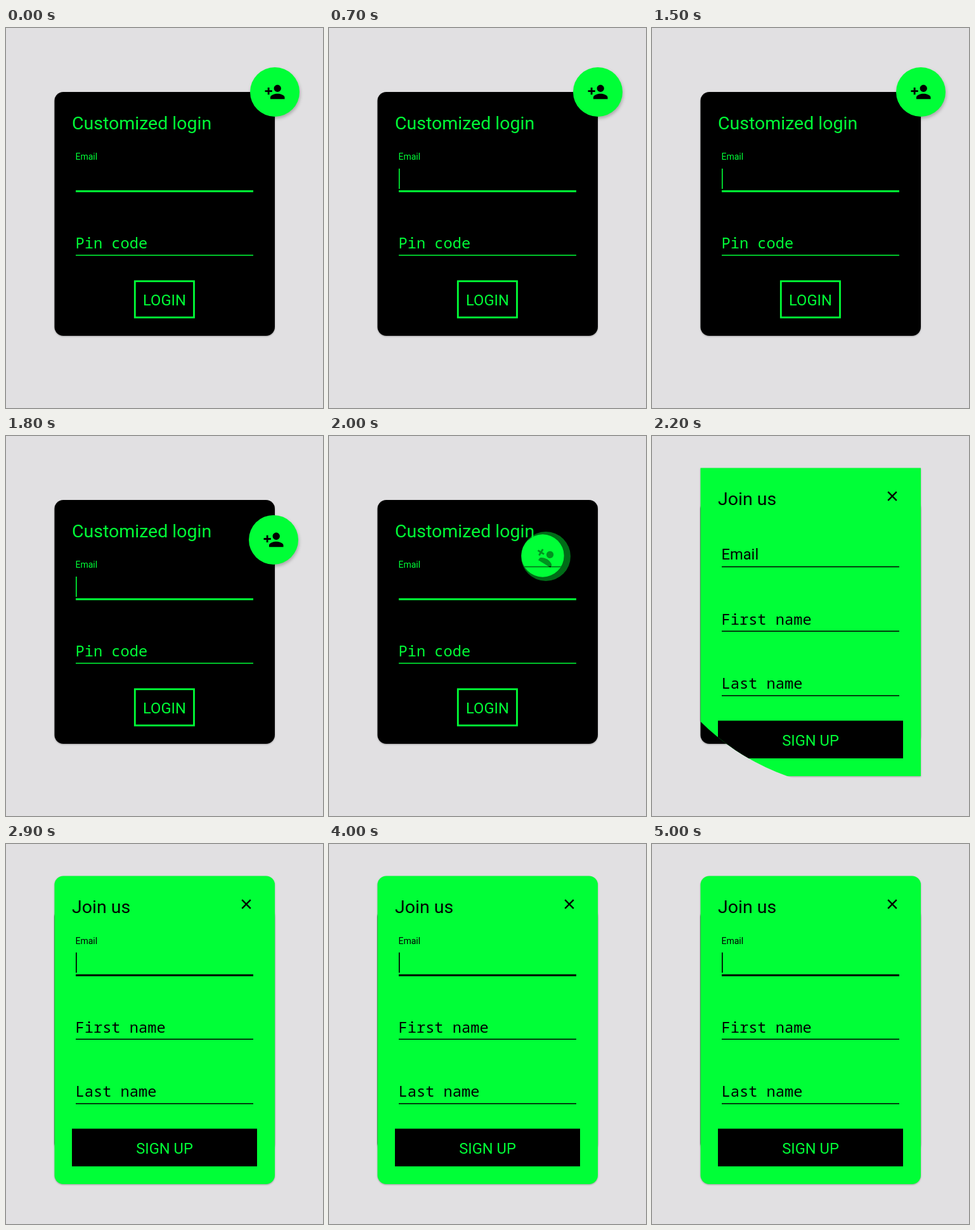
Recreate the animation shown at these times as an HTML page. Size 500 px wide and 600 px high, loop 5100 ms.

```html
<!DOCTYPE html>
<html lang="en">
<head>
<meta charset="utf-8">
<title>Customized login</title>
<style>
  html, body { margin: 0; width: 100%; height: 100%; overflow: hidden; background: #e1e0e2; }
  svg { display: block; width: 500px; height: 600px; }
  text { font: 23.7px Roboto, sans-serif; }
  .title { font-size: 28.5px; }
  .small { font-size: 14px; }
  .mono { font-family: "Noto Sans Mono", "DejaVu Sans Mono", monospace; }
  .mid { text-anchor: middle; }
  .card { filter: drop-shadow(0 1.5px 1.2px rgba(0, 0, 0, .3)); }
  .disc { filter: drop-shadow(1px 3px 2.5px rgba(0, 0, 0, .25)); }
  .green { fill: #00ff37; }
  .line { stroke-width: 1.5; }
  .focus { stroke-width: 3; }
</style>
</head>
<body>
<svg viewBox="0 0 500 600">
  <defs>
    <clipPath id="reveal"><circle id="hole" cx="337" cy="189" r="0"/></clipPath>
  </defs>

  <g class="green" stroke="none">
    <rect class="card" x="76.5" y="101" width="347.5" height="385" rx="14" fill="#000" style="fill:#000"/>
    <text class="title" x="104" y="159.5">Customized login</text>
    <text class="small" x="109.5" y="208">Email</text>
    <rect id="loginCaret" x="110" y="222" width="1.6" height="32"/>
    <path class="focus" d="M110 257.7H390" stroke="#00ff37"/>
    <text class="mono" x="109.5" y="348">Pin code</text>
    <path class="line" d="M110 358.7H390" stroke="#00ff37"/>
    <rect x="203.3" y="399.8" width="93.2" height="57.2" style="fill:none" stroke="#00ff37" stroke-width="2.8"/>
    <text class="mid" x="250" y="438">LOGIN</text>
  </g>

  <g clip-path="url(#reveal)">
    <rect id="joinCard" class="card green" x="76.5" y="50.5" width="347.5" height="486.5"/>
    <text class="title" x="104" y="109">Join us</text>
    <path d="M372.2 88.2l13.6 13.6m0-13.6l-13.6 13.6" stroke="#000" stroke-width="2.4"/>
    <text id="emailLabel" x="109.5">Email</text>
    <rect id="joinCaret" x="110" y="171.3" width="1.7" height="32"/>
    <path id="emailLine" stroke="#000"/>
    <text class="mono" x="109.5" y="297.5">First name</text>
    <path class="line" d="M110 308.3H390" stroke="#000"/>
    <text class="mono" x="109.5" y="399.3">Last name</text>
    <path class="line" d="M110 410H390" stroke="#000"/>
    <rect x="104" y="449.5" width="292" height="59.5"/>
    <text class="mid green" x="250" y="489">SIGN UP</text>
  </g>

  <g id="fab">
    <circle class="disc green" r="39"/>
    <path id="fabIcon" d="M15 12c2.21 0 4-1.79 4-4s-1.79-4-4-4-4 1.79-4 4 1.79 4 4 4zm-9-2V7H4v3H1v2h3v3h2v-3h3v-2H6zm9 4c-2.67 0-8 1.34-8 4v2h16v-2c0-2.66-5.33-4-8-4z"/>
  </g>
</svg>
<script>
  const LOOP = 5100, TICK = 100, BLINK = 500;
  const $ = id => document.getElementById(id);
  const mix = (a, b, p) => a + (b - a) * p;
  const span = (t, start, length) => Math.min(1, Math.max(0, (t - start) / length));
  const inOut = p => (1 - Math.cos(Math.PI * p)) / 2;
  const bezier = (p, a, b, c, d) =>
    (1 - p) ** 3 * a + 3 * (1 - p) ** 2 * p * b + 3 * (1 - p) * p * p * c + p ** 3 * d;
  const set = (id, attrs) => {
    for (const name in attrs) $(id).setAttribute(name, attrs[name]);
  };

  // Standard material curve, cubic-bezier(.4, 0, .2, 1), solved by bisection.
  function fastOutSlowIn(x) {
    let low = 0, high = 1;
    for (let i = 0; i < 20; i++) {
      const m = (low + high) / 2;
      if (bezier(m, 0, .4, .2, 1) < x) low = m; else high = m;
    }
    return bezier(low, 0, 0, 1, 1);
  }

  function draw(t) {
    // The button swings along an arc, then turns and fades.
    const move = inOut(span(t, 1600, 400));
    const fade = span(t, 1885, 200);
    const x = bezier(move, 424, 450, 420, 342);
    const y = bezier(move, 101, 150, 190, 190);
    set('fab', { transform: `translate(${x} ${y})`, opacity: 1 - fade });
    set('fabIcon', { transform: `rotate(${55 * fade}) scale(1.41) translate(-12 -12)` });

    set('hole', { r: t < 2400 ? 500 * inOut(span(t, 1932, 407)) : 700 });
    set('joinCard', { rx: t < 2400 ? 0 : 14 });

    const focused = t >= 2700;
    const float = fastOutSlowIn(span(t, 2680, 200));
    set('emailLabel', { y: mix(195.3, 158, float) });
    $('emailLabel').style.fontSize = mix(23.7, 14, float) + 'px';
    set('emailLine', {
      class: focused ? 'focus' : 'line',
      d: `M110 ${focused ? 207.3 : 206.6}H390`
    });

    const loginOn = Math.floor(t / BLINK) % 2 === 1;
    const joinOn = focused && Math.floor((t - 2700) / BLINK) % 2 === 0;
    set('loginCaret', { opacity: +loginOn });
    set('joinCaret', { opacity: +joinOn });
  }

  const began = performance.now();
  function frame() {
    const t = (performance.now() - began) % LOOP;
    draw(Math.floor(t / TICK) * TICK);
    requestAnimationFrame(frame);
  }
  frame();
</script>
</body>
</html>
```
